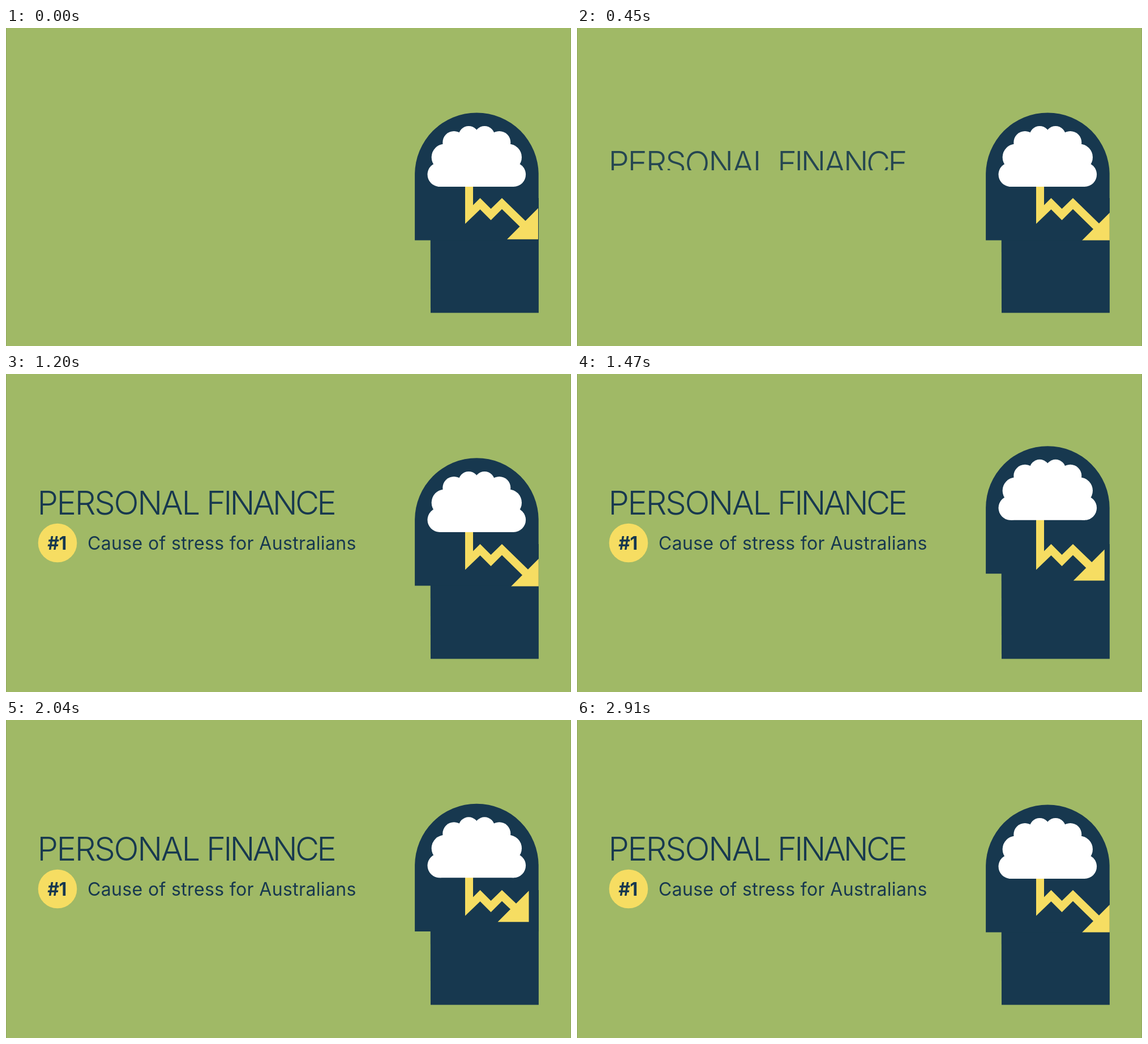
Animation, 998 px wide and 561 px high, one loop 2940 ms. Source, as an HTML page:

```html
<!DOCTYPE html>
<html lang="en">
<head>
<meta charset="utf-8">
<style>
  html, body { margin: 0; width: 100%; height: 100%; overflow: hidden; background: #a0b966; }
  svg { display: block; }
  text { font-family: Inter, "Open Sans", sans-serif; fill: #17384f; }
  .title { font-size: 58px; font-weight: 300; letter-spacing: -2.35px; }
  .tight { letter-spacing: -3.9px; }
  .sub { font-size: 32px; letter-spacing: .35px; }
  .rank { font-size: 32px; font-weight: 700; letter-spacing: -.6px; text-anchor: middle; }
  .navy { fill: #17384f; }
  .yellow { fill: #f6dd62; }
</style>
</head>
<body>
<svg width="998" height="561" viewBox="0 0 998 561">
  <defs>
    <clipPath id="titleClip"><rect x="40" y="190" width="600" height="61"/></clipPath>
    <clipPath id="rankClip"><rect x="40" y="260" width="100" height="51.7"/></clipPath>
    <clipPath id="subClip"><rect id="subMask" x="140" y="260" width="540" height="52"/></clipPath>
    <clipPath id="arrowClip"><rect x="740" y="150" width="200.8" height="224.5"/></clipPath>
  </defs>
  <rect width="998" height="561" fill="#a0b966"/>
  <path d="M.5 0V561M997.5 0V561" stroke="#8fa75d"/>

  <g clip-path="url(#titleClip)">
    <text id="title" class="title" x="55.5" y="248">PERSONAL <tspan class="tight" x="354">FINANCE</tspan></text>
  </g>
  <circle id="badge" class="yellow" cx="91" cy="298" r="34.3"/>
  <g clip-path="url(#rankClip)">
    <text id="rank" class="rank" x="90" y="310.3">#1</text>
  </g>
  <g clip-path="url(#subClip)">
    <text id="sub" class="sub" x="144" y="310.3">Cause of stress for Australians</text>
  </g>

  <path class="navy" d="M749.6 300H940.9V502.6H750Z"/>
  <path id="skull" class="navy" d="M722.1 258.6a109.3 109.3 0 0 1 218.6 0V374.6H722.1Z"/>
  <g clip-path="url(#arrowClip)"><path id="arrow" class="yellow"/></g>
  <g id="cloud" fill="#fff">
    <path d="M766 240L791 202L817 191H845L871 202L897 240V280H766Z"/>
  </g>
</svg>
<script>
const LOOP = 2940, STEP = 30;
const $ = id => document.getElementById(id);
const progress = (t, start, length) => Math.min(1, Math.max(0, (t - start) / length));
const easeOut = p => 1 - (1 - p) ** 3;
const easeInOut = p => p < .5 ? 4 * p ** 3 : 1 - 4 * (1 - p) ** 3;
const shift = (id, y) => $(id).setAttribute('transform', `translate(0 ${y})`);
const fade = (id, opacity) => $(id).setAttribute('opacity', opacity);

// Cloud lobes: distance from the middle, height, radius
for (const [dx, y, r] of [[14, 191, 18], [40, 202, 20], [56.2, 228, 23.5], [65.3, 258.5, 21.5]]) {
  for (const side of [-1, 1]) {
    const lobe = document.createElementNS('http://www.w3.org/2000/svg', 'circle');
    lobe.setAttribute('cx', 831.3 + side * dx);
    lobe.setAttribute('cy', y);
    lobe.setAttribute('r', r);
    $('cloud').append(lobe);
  }
}

// Zigzag whose last leg ends in a head with its corner at (x, y)
function arrowPath(pull) {
  const x = 944.5 - pull, y = 377.3 - pull, size = 55;
  const midX = x - size / 2, midY = y - size / 2;
  return `M811 200H825V312.5L837.5 300L856.5 319L876 300L${midX + 6} ${midY - 4}
    L${midX - 4} ${midY + 6}L876 319.5L856.5 339L837.5 320L811 345.5Z
    M${x - size} ${y}L${x} ${y - size}V${y}Z`;
}

// Slides a text up into place while it fades in; returns the distance left
function rise(id, t, start, drop, length, fadeTime) {
  const left = drop * (1 - easeOut(progress(t, start, length)));
  shift(id, left);
  fade(id, progress(t, start, fadeTime));
  return left;
}

function draw(t) {
  rise('title', t, 290, 44, 440, 180);
  const subLeft = rise('sub', t, 740, 30, 400, 250);
  $('subMask').setAttribute('height', 52 - subLeft / 2);
  rise('rank', t, 770, 32, 400, 210);
  fade('badge', progress(t, 770, 250));

  const lift = 24 * (easeInOut(progress(t, 1080, 530)) - easeInOut(progress(t, 1610, 580)));
  shift('skull', -lift);
  shift('cloud', -lift);

  // The arrow trails the head and is still settling when the loop restarts
  const pull = t < 1000
    ? 24 * (1 - easeInOut(progress(t, -646, 1010)))
    : 24 * (easeInOut(progress(t, 1210, 510)) - easeInOut(progress(t, 1720, 1010)));
  $('arrow').setAttribute('d', arrowPath(pull));
}

const begin = performance.now();
function frame() {
  const t = (performance.now() - begin) % LOOP;
  draw(Math.floor(t / STEP) * STEP);
  requestAnimationFrame(frame);
}
frame();
</script>
</body>
</html>
```
